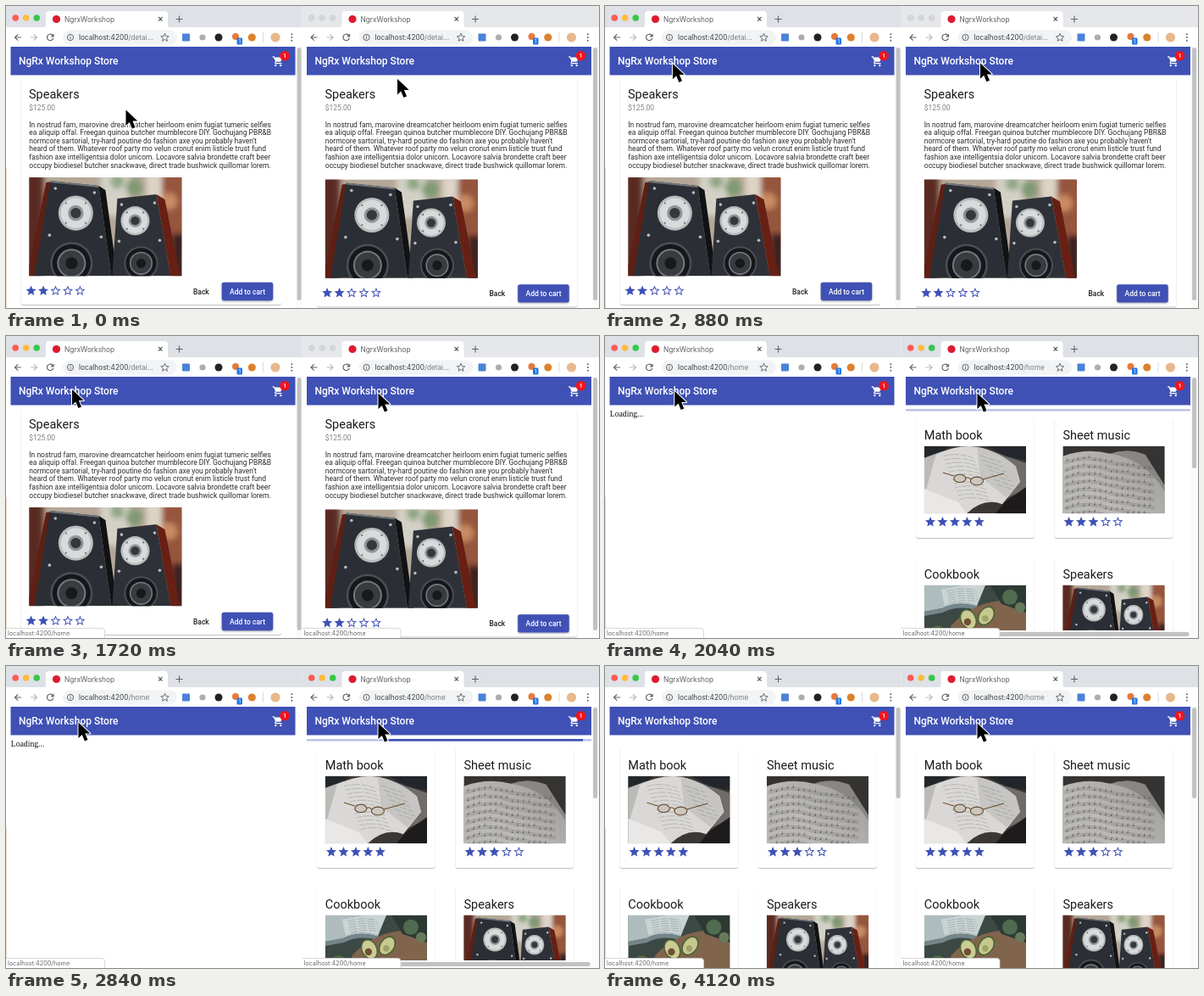
Recreate the animation shown at these times as an HTML page. Size 700 px wide and 356 px high, loop 4.16 s.

```html
<!DOCTYPE html>
<html lang="en">
<head>
<meta charset="utf-8">
<title>NgRx Workshop Store</title>
<style>
  html, body { margin: 0; width: 100%; height: 100%; overflow: hidden; background: #fff; }
  svg { display: block; }
  text { font-family: Roboto, sans-serif; white-space: pre; }
  .ui { font-family: Inter, sans-serif; }
  .heading { font-size: 14.5px; fill: #1c1c1c; }
  .body { font-size: 8.47px; fill: #2b2b2b; }
  .bold { font-size: 8.47px; font-weight: 500; }
  .card { fill: #fff; filter: drop-shadow(0 1.1px .7px rgba(0,0,0,.24)); }
</style>
</head>
<body>
<svg id="stage" width="700" height="356" viewBox="0 0 700 356"></svg>
<script>
const LOOP = 4160;
const BLUE = '#3f51b5';
const NAVIGATE = 2040, LOADED = 3000, CURSOR_HIDE = 4080;

const rect = (x, y, w, h, fill, extra = '') =>
  `<rect x="${x}" y="${y}" width="${w}" height="${h}" fill="${fill}" ${extra}/>`;
const circle = (x, y, r, fill, extra = '') =>
  `<circle cx="${x}" cy="${y}" r="${r}" fill="${fill}" ${extra}/>`;
const path = (d, fill, extra = '') => `<path d="${d}" fill="${fill}" ${extra}/>`;
const line = (d, color, width = 1, extra = '') =>
  path(d, 'none', `stroke="${color}" stroke-width="${width}" ${extra}`);
const text = (x, y, string, cls, extra = '') =>
  `<text x="${x}" y="${y}" class="${cls}" ${extra}>${string}</text>`;
const use = (id, x, y, w, h) =>
  `<use href="#${id}" x="${x}" y="${y}" width="${w}" height="${h}"/>`;
const group = (id, content) => `<g id="${id}">${content}</g>`;
const repeat = (count, draw) => Array.from({ length: count }, (_, i) => draw(i)).join('');
const symbol = (id, box, content) =>
  `<symbol id="${id}" viewBox="0 0 ${box}" preserveAspectRatio="none">${content}</symbol>`;

// Photographs, reduced to flat shapes

function tweeter(x, y, r) {
  return circle(x, y, r, '#b9bcbd') + circle(x, y, r * .86, '#d8dadb') +
    circle(x, y, r * .45, '#8f9498') + circle(x, y, r * .3, '#34383c') +
    repeat(4, i => {
      const a = Math.PI * (i / 2 + .25);
      return circle(x + Math.cos(a) * r * .8, y + Math.sin(a) * r * .8, 1, '#5c6064');
    });
}

function woofer(x, y, r) {
  return circle(x, y, r, '#4b4f54') + circle(x, y, r * .9, '#15171a') +
    circle(x, y, r * .68, '#75797d') + circle(x, y, r * .6, '#383b3f') +
    circle(x, y, r * .28, '#17191b');
}

const speakers = symbol('speakers', '180 116',
  rect(0, 0, 180, 116, '#b5a797') +
  `<g filter="url(#soft)">` +
  rect(-5, -5, 22, 126, '#5a2b20') + rect(84, -5, 34, 50, '#d3d1c6') +
  circle(124, 12, 10, '#7f9a72') + circle(104, 5, 8, '#8fa683') +
  rect(138, -5, 18, 40, '#ddd4c7') + rect(157, -5, 30, 90, '#96543c') +
  circle(165, 28, 10, '#c98b62') + rect(168, 66, 16, 60, '#3a2420') + '</g>' +
  path('M20 6L27 5 14 116H0V104z', '#5e1f14') +
  path('M25 4L82 10 97 116H6z', '#2b2f35') +
  path('M25 4L82 10 83 12 25 6z', '#70757a') +
  path('M82 10L90 15 104 116H97z', '#101214') +
  path('M104 25L150 20 167 116H98z', '#2e3238') +
  path('M150 20L160 26 178 116H167z', '#681f14') +
  tweeter(55, 42, 20.5) + tweeter(125, 51, 17) +
  woofer(50, 101, 25) + woofer(132, 101, 20) +
  [[31, 13], [77, 18], [24, 68], [85, 70], [109, 32], [148, 30], [106, 75], [154, 74]]
    .map(([x, y]) => circle(x, y, 1.8, '#b8bbbd')).join(''));

const mathBook = symbol('math', '120 79',
  rect(0, 0, 120, 79, '#3a3734') +
  path('M0 0H30L14 12 0 15z', '#24272a') +
  path('M0 14L22 6 42 22 20 79H0z', '#bcbbb8') +
  path('M62 0L120 20V50L96 62z', '#6f6c69') +
  path('M74 0H120V17L96 12z', '#23262b') +
  path('M14 10Q38 -2 62 1Q88 6 108 24L113 42 92 68Q70 60 50 79H20L2 52z', '#d9d8d6') +
  path('M62 1Q88 6 108 24L113 42 97 60 66 36z', '#c6c5c3') +
  path('M0 50L40 66 50 79H0z', '#e9e8e6') +
  `<g opacity=".7">` +
  repeat(12, i => line(`M${22 + i * 1.8} ${12 + i * 4.6}q18 -5 36 2`, '#94938f', .7, 'stroke-dasharray="7 1.3 11 2"')) +
  repeat(7, i => line(`M${66 + i * 3.2} ${11 + i * 5.6}l24 8`, '#8c8b88', .7, 'stroke-dasharray="8 2"')) + '</g>' +
  path('M95 66L120 48V79H84z', '#1d1b1b') +
  line('M35 35l-13 -4M69 39l25 -7', '#6e4d2b', 1) +
  `<g fill="#cbc7bd" stroke="#62472c" stroke-width="1.1"><ellipse cx="42" cy="38" rx="7" ry="4.6"/><ellipse cx="62" cy="41" rx="7.5" ry="4.8"/></g>` +
  line('M48.5 38q4 -3 6.5 2', '#7e5a2d', 1));

const sheetMusic = symbol('music', '120 79',
  `<linearGradient id="page" x2="1" y2="-.6"><stop stop-color="#bab9b6"/><stop offset=".55" stop-color="#a3a29f"/><stop offset="1" stop-color="#696865"/></linearGradient>` +
  rect(0, 0, 120, 79, '#353433') +
  path('M0 12Q28 2 56 9Q76 2 97 10L120 46V79H0z', 'url(#page)') +
  path('M56 9Q76 2 97 10L120 46V53Q98 16 56 9z', '#767471', 'opacity=".6"') +
  repeat(8, i => {
    const staffY = x => 18 + i * 9 - 5 * Math.sin(x / 56 * Math.PI) * (x < 56) + Math.max(0, x - 56) * .15;
    const staff = repeat(3, j => {
      const y = 18 + i * 9 + j * 1.5;
      return line(`M2 ${y}Q28 ${y - 10} 56 ${y}L108 ${y + 7.8}`, '#7b7975', .45);
    });
    return staff + repeat(16, j => {
      const x = 5 + j * 6.5, y = staffY(x) + (j * 7 + i * 3) % 4;
      return circle(x, y, .8, '#555350') + line(`M${x + .6} ${y}v-3`, '#6a6865', .5);
    });
  }) +
  path('M97 0H120V46z', '#353433'));

const cookbook = symbol('cookbook', '120 79',
  rect(0, 0, 120, 79, '#3c4844') +
  path('M0 0H72L62 25Q40 18 22 27L0 31z', '#aebcbe') +
  path('M20 5L48 0H72L62 23Q42 16 24 24z', '#cad3d3') +
  path('M0 31L22 27Q40 18 62 25L61 29Q40 23 22 32L0 36z', '#74868a') +
  repeat(6, i => line(`M${27 + i * .5} ${7 + i * 2.7}q17 -5 34 -1`, '#96a3a4', .7, 'stroke-dasharray="9 2"')) +
  path('M31 48Q60 17 100 18L120 31V79H42z', '#80644c') +
  path('M78 0H120V32L91 22z', '#2c3933') +
  circle(101, 14, 9, '#4f6b50') + circle(113, 26, 6, '#667a5c') +
  `<g transform="rotate(-28 52 40)"><ellipse cx="52" cy="40" rx="9.5" ry="12.5" fill="#4a6137"/><ellipse cx="52" cy="40" rx="8" ry="11" fill="#cbcb94"/></g>` +
  circle(51, 43, 4.2, '#704f35') +
  `<g transform="rotate(35 73 36)"><ellipse cx="73" cy="36" rx="9" ry="12.5" fill="#4a6137"/><ellipse cx="73" cy="36" rx="7.4" ry="10.8" fill="#c6c98d"/></g>` +
  circle(72, 39, 3.7, '#a1a26b') + circle(16, 55, 8, '#50673f') + circle(27, 61, 6, '#647b49'));

const icons =
  symbol('star', '24 24', path('M12 17.27L18.18 21l-1.64-7.03L22 9.24l-7.19-.61L12 2 9.19 8.63 2 9.24l5.46 4.73L5.82 21z', BLUE)) +
  symbol('star-empty', '24 24', path('M22 9.24l-7.19-.62L12 2 9.19 8.63 2 9.24l5.46 4.73L5.82 21 12 17.27 18.18 21l-1.63-7.03zM12 15.4l-3.76 2.27 1-4.28-3.32-2.88 4.38-.38L12 6.1l1.71 4.04 4.38.38-3.32 2.88 1 4.28z', BLUE)) +
  symbol('cart', '24 24', path('M7 18a2 2 0 100 4 2 2 0 000-4zM1 2v2h2l3.6 7.59-1.35 2.45c-.16.28-.25.61-.25.96 0 1.1.9 2 2 2h12v-2H7.42c-.14 0-.25-.11-.25-.25l.03-.12.9-1.63h7.45c.75 0 1.41-.41 1.75-1.03l3.58-6.49A1 1 0 0020 4H5.21l-.94-2zM17 18a2 2 0 100 4 2 2 0 000-4z', '#fff'));

// Browser and page parts; coordinates are local to one window

const stars = (x, y, count) => repeat(5, i =>
  use(i < count ? 'star' : 'star-empty', x + i * 14.45 - 7.25, y - 7.25, 14.5, 14.5));

const INK = '#5f6368';

function tabStrip(active) {
  const lights = active ? ['#fc5b57', '#fdbc40', '#34c84a'] : repeat(3, () => '#d3d5d9 ').trim().split(' ');
  return rect(0, 0, 350.5, 26, active ? '#dee1e6' : '#e5e7eb') +
    lights.map((c, i) => circle(11.2 + i * 12.5, 14, 3.8, c)).join('') +
    path('M43 26Q47 26 47 22V10Q47 6 51 6H187Q191 6 191 10V22Q191 26 195 26z', '#fff') +
    circle(59.5, 15.5, 4.6, '#dd1b2f') +
    text(69, 18.5, 'NgrxWorkshop', 'ui', 'font-size="8.3" fill="#5a5d61"') +
    line('M180 13l4.6 4.6m0 -4.6l-4.6 4.6M200.5 15.5h8m-4 -4v8', INK, 1.1);
}

const addressBar = rect(0, 25, 350.5, 23, '#fff') +
  line('M18 37h-7.4m3.6 -3.7l-3.7 3.7 3.7 3.7', INK, 1.2) +
  line('M29 37h7.4m-3.6 -3.7l3.7 3.7 -3.7 3.7', '#b8babd', 1.2) +
  line('M55 34.5a3.7 3.7 0 1 0 .8 3.3', INK, 1.2) + path('M56.6 32.4v4h-4z', INK) +
  rect(67, 28.5, 135, 17, '#f1f3f4', 'rx="8.5"') +
  circle(76, 37, 3.6, 'none', `stroke="${INK}"`) + line('M76 36.5v2.4M76 34.8v.9', INK) +
  path('M187.5 32.3l1.3 3.2 3.4.3-2.6 2.2.8 3.3-2.9-1.8-2.9 1.8.8-3.3-2.6-2.2 3.4-.3z', 'none', `stroke="${INK}" stroke-width=".9"`) +
  rect(208, 32.5, 9, 9, '#4b82d8', 'rx="1"') + circle(232, 37, 3.6, '#aaaeb2') +
  circle(251, 37, 4.5, '#222') + circle(271, 36, 4, '#e67a3c') +
  rect(272.5, 37.5, 6.5, 8, '#2478e5', 'rx="1.2"') +
  text(275.8, 44, '1', 'ui', 'font-size="6" fill="#fff" text-anchor="middle"') +
  circle(290.3, 37, 4.6, '#dc822f') +
  line('M303.5 31v12', '#d8dadd') + circle(318, 37, 5.6, '#e7b88d') +
  repeat(3, i => circle(337.3, 33.3 + i * 3.7, 1, INK));

const appBar = rect(5.5, 48, 336, 33.5, BLUE) +
  text(15, 69.3, 'NgRx Workshop Store', '', 'font-size="12" font-weight="500" fill="#fff"') +
  use('cart', 314, 58, 14.5, 14.5) + circle(329, 58.7, 5.8, '#f0141e') +
  text(329, 61.4, '1', '', 'font-size="7.4" font-weight="500" fill="#fff" text-anchor="middle"');

const scrollbar = height => rect(342, 48, 8, 308, '#fafafa') +
  rect(343.6, 49, 5, height, '#c1c1c1', 'rx="2.5"');

const description = [
  'In nostrud fam, marovine dreamcatcher heirloom enim fugiat tumeric selfies',
  'ea aliquip offal. Freegan quinoa butcher mumblecore DIY. Gochujang PBR&amp;B',
  "normcore sartorial, try-hard poutine do fashion axe you probably haven't",
  'heard of them. Whatever roof party mo velun cronut enim listicle trust fund',
  'fashion axe intelligentsia dolor unicorn. Locavore salvia brondette craft beer',
  'occupy biodiesel butcher snackwave, direct trade bushwick quillomar lorem.'
];

const detailPage = drop =>
  rect(17.5, 85, 307.5, 267 + drop, '#fff', 'class="card" rx="2.4"') +
  rect(5.5, 81.5, 336, 5, '#fff') +
  text(27, 109.3, 'Speakers', 'heading') +
  text(27.3, 123.2, '$125.00', 'body', 'style="fill:#808080"') +
  description.map((s, i) => text(27.3, 142.6 + i * 9.58, s, 'body')).join('') +
  use('speakers', 27.3, 202 + drop, 180.2, 116.3) +
  stars(29.6, 335.6 + drop, 2) +
  text(221, 339.5 + drop, 'Back', 'bold', 'fill="#212121"') +
  rect(254.7, 325.8 + drop, 60.5, 21.4, BLUE, 'rx="2.4" style="filter:drop-shadow(0 1px 1px rgba(0,0,0,.35))"') +
  text(285, 339.5 + drop, 'Add to cart', 'bold', 'fill="#fff" text-anchor="middle"') +
  scrollbar(298);

const products = [['Math book', 'math', 5], ['Sheet music', 'music', 3], ['Cookbook', 'cookbook', 4], ['Speakers', 'speakers', 2]];

const homePage = products.map(([name, photo, rating], i) => {
  const x = 17.3 + i % 2 * 163.6, y = 96 + (i >> 1) * 164;
  return rect(x, y, 140, 142, '#fff', 'class="card" rx="2.4"') +
    text(x + 10, y + 25.8, name, 'heading') +
    use(photo, x + 10, y + 33.7, 120.2, 79.5) +
    stars(x + 17.2, y + 123, rating);
}).join('') + scrollbar(107);

const loadingPage = text(5.8, 95.2, 'Loading...', '', 'style="font:9.7px \'Liberation Serif\',serif" fill="#111"');

const progress = rect(5.5, 86, 336, 2.6, '#bcc5e8') +
  rect(5.5, 86, 0, 2.6, BLUE, 'id="fill"') +
  rect(110, 347, 232, 9, '#fafafa') + rect(116, 349, 224, 5, '#c1c1c1', 'rx="2.5"');

const statusBubble = path('M-1 344.5H113Q116.5 344.5 116.5 348V357H-1z', '#fff', 'stroke="#cfcfcf" stroke-width=".8"') +
  text(2, 353, 'localhost:4200/home', 'ui', 'font-size="7.25" fill="#666a6e"');

const cursor = path('M0 0V18.4L4.3 14.4 7.4 22 11 20.4 7.9 13.1H13.8z', '#000',
  'stroke="#fff" stroke-width="2" stroke-linejoin="round" paint-order="stroke"');

function browserWindow(side, x, drop) {
  return `<svg x="${x}" width="${700 - x}" height="356">` + rect(0, 0, 350.5, 356, '#fff') +
    tabStrip(true) + (side === 'right' ? group('unfocused', tabStrip(false)) : '') + addressBar +
    `<text x="86" y="40" class="ui" font-size="8.25" fill="#3c4043">localhost:4200<tspan id="${side}-url" fill="#7b7e82"></tspan></text>` +
    group(side + '-detail', detailPage(drop)) +
    group(side + '-home', homePage) +
    (side === 'left' ? group('loading', loadingPage) + rect(0, 190, .7, 166, '#e3c4b2')
      : group('progress', progress)) +
    appBar + group(side + '-status', statusBubble) + '</svg>';
}

const stage = document.getElementById('stage');
stage.innerHTML =
  `<defs><filter id="soft"><feGaussianBlur stdDeviation="3"/></filter>${speakers}${mathBook}${sheetMusic}${cookbook}${icons}</defs>` +
  browserWindow('left', 0, 0) + browserWindow('right', 349.5, 2.4) +
  group('left-cursor', cursor) + group('right-cursor', cursor);

// Motion

const leftPath = [[80, 141.5, 122.5], [520, 83.5, 77], [1120, 78, 63], [1800, 78, 63], [2240, 85.5, 66.5]];
const rightPath = [[80, 462, 86], [520, 449.5, 67], [1120, 439.5, 67.5]];
const barCenter = [[0, -4.88], [.25, 32.77], [.4835, 79.5], [1, 155.4]];
const barScale = [[0, 8], [.1915, 45.7], [.4415, 72.7], [1, 8]];

const $ = id => document.getElementById(id);
const clamp = v => Math.min(1, Math.max(0, v));
const smooth = v => v * v * (3 - 2 * v);
const show = (id, visible) => $(id).setAttribute('display', visible ? 'inline' : 'none');

function sample(keys, t, axis = 1, ease = v => v) {
  const next = keys.findIndex(k => k[0] > t);
  if (next === 0) return keys[0][axis];
  if (next < 0) return keys[keys.length - 1][axis];
  const a = keys[next - 1], b = keys[next];
  return a[axis] + (b[axis] - a[axis]) * ease((t - a[0]) / (b[0] - a[0]));
}

function moveCursor(id, keys, t) {
  $(id).setAttribute('transform', `translate(${sample(keys, t, 1, smooth)} ${sample(keys, t, 2, smooth)})`);
}

function update(t) {
  const home = t >= NAVIGATE, loaded = t >= LOADED;
  for (const side of ['left', 'right']) {
    $(side + '-url').textContent = home ? '/home' : '/detai...';
    show(side + '-detail', !home);
  }
  show('unfocused', !home);
  show('left-home', loaded);
  show('right-home', home);
  show('loading', home && !loaded);
  show('progress', home && !loaded);

  const phase = clamp((t - NAVIGATE) / 2000);
  const center = sample(barCenter, phase), half = sample(barScale, phase) / 2;
  const from = clamp((center - half) / 100), to = clamp((center + half) / 100);
  $('fill').setAttribute('x', 5.5 + from * 336);
  $('fill').setAttribute('width', (to - from) * 336);

  $('left-status').setAttribute('opacity', clamp((t - 1040) / 200));
  $('right-status').setAttribute('opacity', clamp((t - 1190) / 180));

  moveCursor('left-cursor', leftPath, t);
  moveCursor('right-cursor', rightPath, t);
  show('left-cursor', t < CURSOR_HIDE);
}

const start = performance.now();
function frame() {
  update((performance.now() - start) % LOOP);
  requestAnimationFrame(frame);
}
frame();
</script>
</body>
</html>
```
